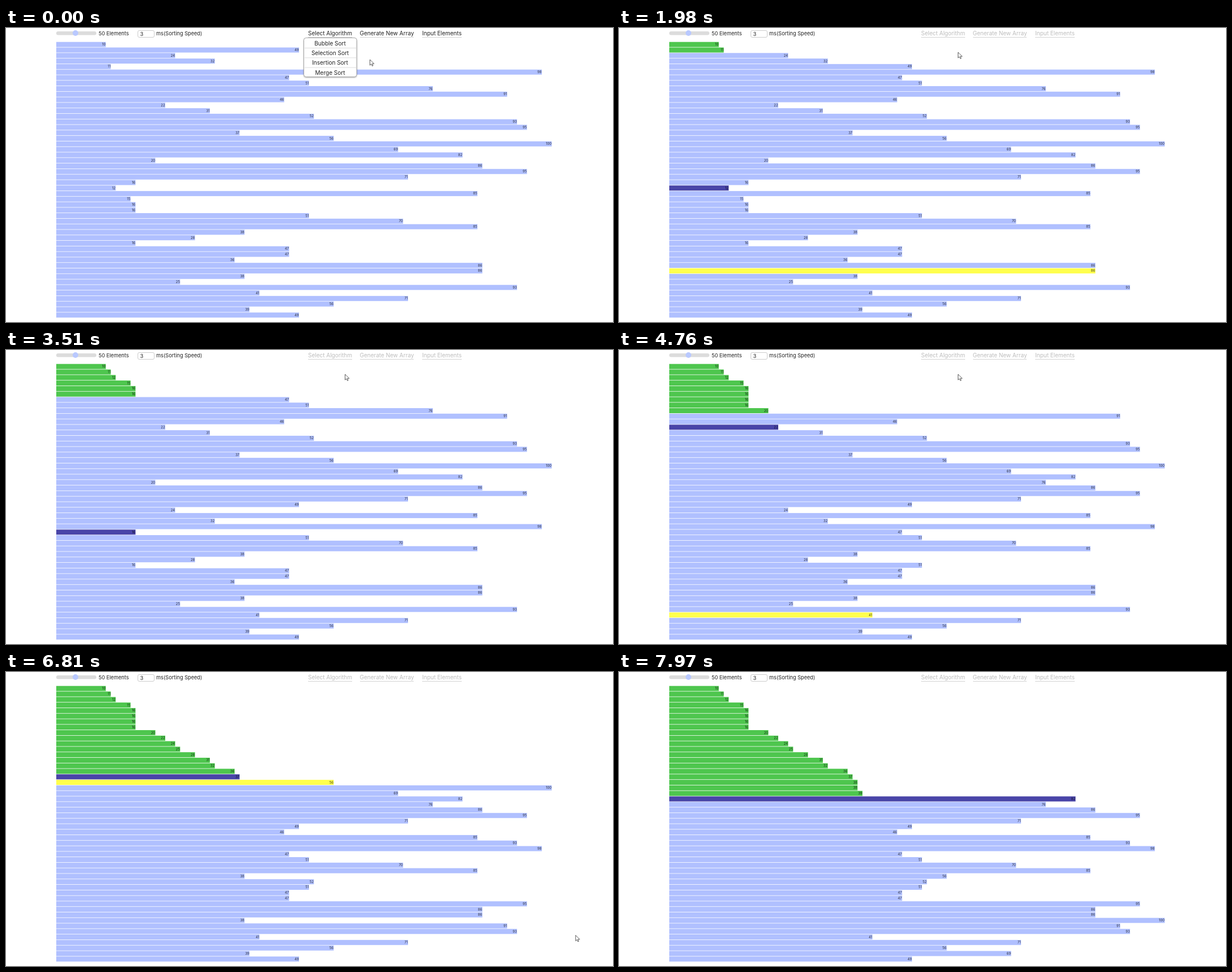
Animation of 1075x521 px, one loop 8000 ms. Source, as an HTML page:

```html
<!DOCTYPE html>
<html lang="en">
<head>
<meta charset="utf-8">
<title>Selection sort</title>
<style>
  html, body { margin: 0; width: 100%; height: 100%; overflow: hidden; background: #fff; }
  svg { display: block; width: 1075px; height: 521px; font: 10px Inter, Roboto, sans-serif; }
  .label { font-size: 6px; fill: #000; fill-opacity: .75; text-anchor: end; }
  .side { font-size: 9.2px; fill: #222; }
  .mid { text-anchor: middle; fill: #222; }
  .link line { stroke: #d2d2d2; }
  .off text { fill: #bdbdbd; }
  #menu rect { fill: #fff; stroke: #aaa; filter: drop-shadow(0 1px 1px #0005); }
  #menu line { stroke: #ddd; }
  .cursor path { fill: #fff; stroke: #333; stroke-width: .8; stroke-linejoin: round; }
</style>
</head>
<body>
<svg viewBox="0 0 1075 521">
  <rect x="89" y="6" width="71" height="6.5" rx="3.2" fill="#dcdcdc"/>
  <circle cx="123" cy="9" r="5" fill="#b9c9ff"/>
  <text class="side" x="164" y="13">50 Elements</text>
  <rect x="233.5" y="4.5" width="29" height="12" rx="2.5" fill="#fff" stroke="#ccc"/>
  <text class="side" x="237.5" y="13.5">3</text>
  <text class="side" x="266" y="13">ms(Sorting Speed)</text>
  <g id="nav"></g>
  <g id="bars"></g>
  <g id="menu"><rect x="527.5" y="17.5" width="93.5" height="69" rx="4"/></g>
  <g class="cursor" id="arrow"><path d="M0 0V10L2.4 7.9 4 11.4 5.6 10.7 4 7.3H7.3Z"/></g>
  <g class="cursor" id="hand"><path d="M-1 7V1Q0-.8 1 1V5Q2 4 3 5.2 4.3 4.6 5 5.8 6.6 5.4 7 7V9.5L5.5 13H-.5L-3.8 8.4Q-3.4 6.6-1 8.3Z"/></g>
</svg>
<script>
const LOOP = 8000, CLOSE_MENU = 650, REPAINT = 48.9;
const LEFT = 89, TOP = 24.72, PITCH = 9.785, UNIT = 8.775;
const colors = { idle: '#b0c0ff', sorted: '#4ec64e', least: '#4945a8', probe: '#ffff4d' };

// The unsorted array
const values = [10, 49, 24, 32, 11, 98, 47, 51, 76, 91, 46, 22, 31, 52, 93, 95, 37,
  56, 100, 69, 82, 20, 86, 95, 71, 16, 12, 85, 15, 16, 16, 51, 70, 85, 38, 28, 16,
  47, 47, 36, 86, 86, 38, 25, 93, 41, 71, 56, 39, 49];

// Spans in which the screen is not repainted
const pauses = [[300, 650], [940, 1120], [1230, 1380], [1430, 1580], [3510, 3710],
  [4320, 4470], [4560, 4760], [6580, 6740]];

// Key points: time, then sorting steps done or pointer position
const progress = [[750, 0], [1970, 138], [4760, 450], [5689, 553], [6788, 681], [7960, 810]];
const route = [[0, 644.5, 56], [300, 600.5, 43], [5460, 600.5, 43], [5560, 805, 195],
  [5689, 973.8, 354.5], [6480, 1008.8, 466.5], [7400, 1008.8, 466.5], [7600, 1026, 535]];

const byId = id => document.getElementById(id);

function add(parent, tag, attrs, text = '') {
  const node = document.createElementNS('http://www.w3.org/2000/svg', tag);
  for (const key in attrs) node.setAttribute(key, attrs[key]);
  node.textContent = text;
  return parent.appendChild(node);
}

function sample(points, t) {
  const next = points.findIndex(p => p[0] > t);
  if (next < 0) return points[points.length - 1].slice(1);
  const [a, b] = [points[Math.max(0, next - 1)], points[next]];
  const u = (t - a[0]) / (b[0] - a[0] || 1);
  return a.slice(1).map((v, i) => v + (b[i + 1] - v) * u);
}

// Time of the latest repaint, and whether the screen rests
function repaint(t) {
  let resumed = 0;
  for (const [start, end] of pauses) {
    if (t < start) break;
    if (t < end) return { time: start, resting: true };
    resumed = end;
  }
  return { time: t - (t - resumed) % REPAINT, resting: false };
}

// Pass i takes one step to mark row i and one for each row below it
function sortState(steps) {
  const list = values.slice();
  for (let i = 0; ; i++) {
    let least = i;
    const probe = Math.min(list.length - 1, i + steps);
    for (let j = i + 1; j <= probe; j++) if (list[j] < list[least]) least = j;
    if (steps < list.length - i) return { list, done: i, least, probe };
    steps -= list.length - i;
    [list[i], list[least]] = [list[least], list[i]];
  }
}

[['Select Algorithm', 535, 613], ['Generate New Array', 627, 722], ['Input Elements', 737, 807]]
  .forEach(([name, x1, x2]) => {
    const link = add(byId('nav'), 'g', { class: 'link' });
    add(link, 'text', { class: 'mid', x: (x1 + x2) / 2, y: 13 }, name);
    add(link, 'line', { x1, x2, y1: 16.5, y2: 16.5 });
  });

['Bubble', 'Selection', 'Insertion', 'Merge'].forEach((name, i) => {
  const y = 30.8 + i * 17.3;
  add(byId('menu'), 'text', { class: 'mid', x: 574, y }, name + ' Sort');
  if (i < 3) add(byId('menu'), 'line', { x1: 529, x2: 620, y1: y + 4.7, y2: y + 4.7 });
});

const bars = values.map((_, i) => {
  const y = TOP + i * PITCH;
  return {
    rect: add(byId('bars'), 'rect', { x: LEFT, y, height: 9 }),
    label: add(byId('bars'), 'text', { class: 'label', y: y + 6.5 })
  };
});

function draw(t) {
  const { time, resting } = repaint(t);
  const sorting = time >= progress[0][0];
  const { list, done, least, probe } = sortState(Math.floor(sample(progress, time)[0]));
  bars.forEach(({ rect, label }, i) => {
    const width = list[i] * UNIT;
    const role = !sorting ? 'idle' : i < done ? 'sorted' : i === least ? 'least'
      : i === probe && !resting ? 'probe' : 'idle';
    rect.setAttribute('width', width);
    rect.setAttribute('fill', colors[role]);
    label.setAttribute('x', LEFT - 0.4 + width);
    label.textContent = list[i];
  });

  const open = time < CLOSE_MENU;
  byId('menu').style.display = open ? '' : 'none';
  byId('nav').setAttribute('class', open ? '' : 'off');

  const [x, y] = sample(route, time);
  const pointing = open && x < 621;
  for (const id of ['arrow', 'hand']) {
    byId(id).setAttribute('transform', `translate(${x} ${y})`);
    byId(id).style.display = pointing === (id === 'hand') ? '' : 'none';
  }
}

const begin = performance.now();
function frame() {
  draw((performance.now() - begin) % LOOP);
  requestAnimationFrame(frame);
}
frame();
</script>
</body>
</html>
```
